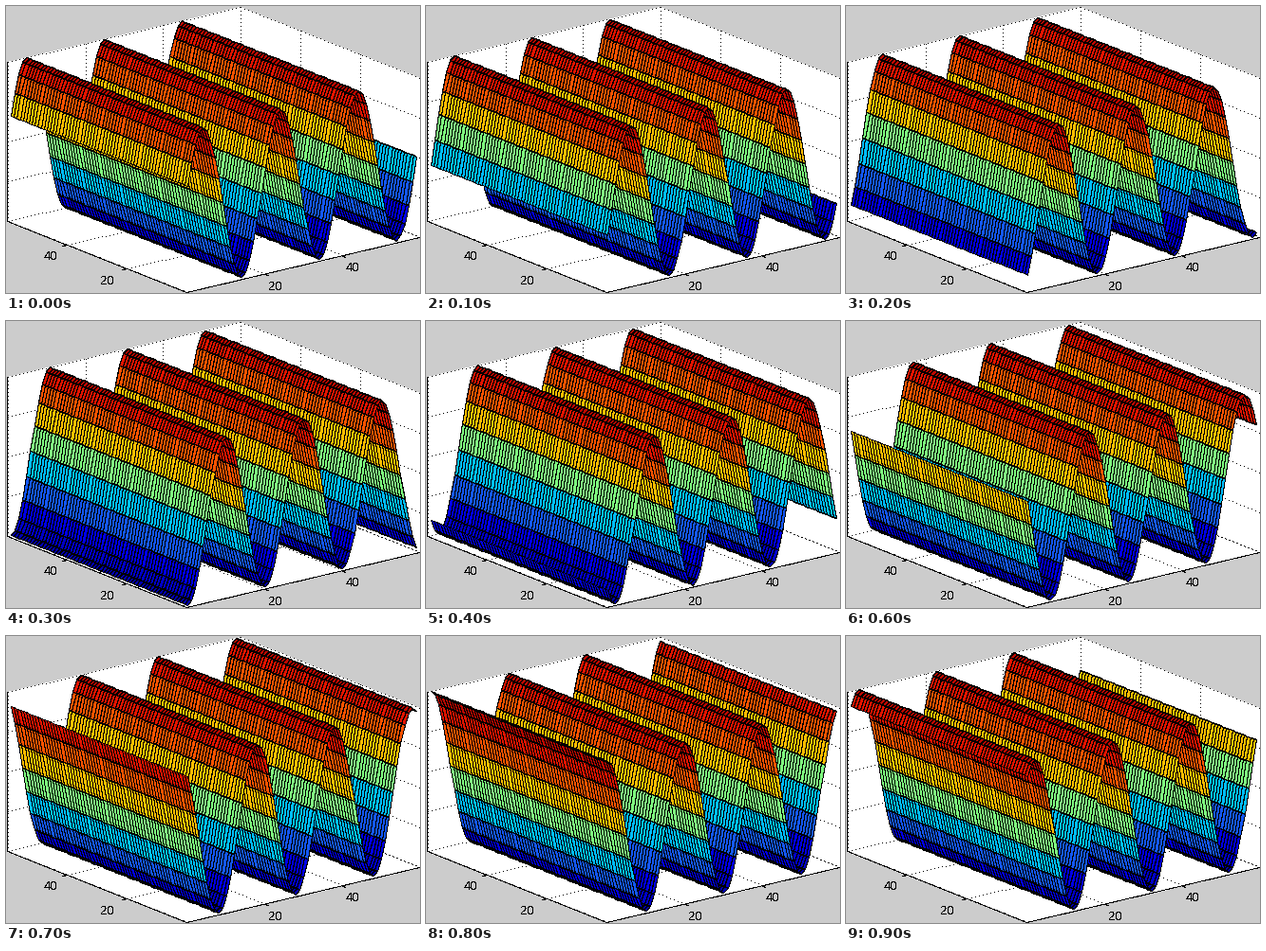
A matplotlib script that plays this animation: 436x303 px, repeating every 1000 ms.

```python
import numpy as np
import matplotlib.pyplot as plt
from matplotlib.animation import FuncAnimation
from matplotlib.collections import PolyCollection

W, H, DPI = 436, 303, 100
FRAMES, INTERVAL = 10, 100
SIZE = 60            # extent of both floor axes
DOT_GAP = 4          # pixels between dots of the grid lines
HAIR = 0.008         # half width of a stroke; aliased fill makes it one pixel

# Face colours by height level, from trough to crest
LEVELS = np.array([
    (0, 0, 175), (0, 0, 200), (0, 0, 232), (20, 88, 245), (0, 191, 255),
    (128, 255, 128),
    (255, 191, 0), (255, 84, 0), (228, 20, 0), (190, 8, 0), (165, 0, 0),
]) / 255


def project(x, y, z):
    """Orthographic view of the plot box, snapped to pixel centres."""
    sx = 190.5 + 4.083 * x - 3.15 * y
    sy = 302.5 - 0.967 * x - 1.25 * y - 84 * (z + 1)
    return np.floor(np.stack(np.broadcast_arrays(sx, sy), axis=-1)) + 0.5


def path(*points):
    return np.array([project(*p) for p in points])


def strokes(start, end):
    """Hairline quads that rasterise as crisp one-pixel lines."""
    run = np.abs(end - start)
    steep = run[..., 1:] > run[..., :1]
    side = np.where(steep, (HAIR, 0), (0, HAIR))
    return np.stack([start + side, end + side, end - side, start - side],
                    axis=-2)


def dots(start, end):
    length = np.abs(end - start).max()
    t = np.arange(0, length + 1, DOT_GAP)[:, None] / length
    return np.floor(start + t * (end - start)) + 0.5


fig = plt.figure(figsize=(W / DPI, H / DPI), dpi=DPI, facecolor="#cccccc")
ax = fig.add_axes([0, 0, 1, 1])
ax.set(xlim=(0, W), ylim=(H, 0))
ax.axis("off")

# White floor and back walls
S = SIZE
walls = [
    path((0, 0, -1), (S, 0, -1), (S, S, -1), (0, S, -1)),
    path((0, S, -1), (S, S, -1), (S, S, 1), (0, S, 1)),
    path((S, 0, -1), (S, S, -1), (S, S, 1), (S, 0, 1)),
]
ax.add_collection(PolyCollection(walls, facecolors="white", edgecolors="none",
                                 antialiaseds=False, zorder=1))

grid = []
for t in range(0, S + 1, 20):
    grid.append(path((t, 0, -1), (t, S, -1), (t, S, 1)))
    grid.append(path((0, t, -1), (S, t, -1), (S, t, 1)))
for z in np.linspace(-1, 1, 5):
    grid.append(path((0, S, z), (S, S, z), (S, 0, z)))
grid_dots = np.concatenate([dots(a, b) for line in grid
                            for a, b in zip(line, line[1:])])
ax.plot(*grid_dots.T, ",", color="black", zorder=2)

axes_lines = [path((0, S, 1), (0, S, -1), (0, 0, -1), (S, 0, -1))]
for t in (20, 40):
    axes_lines.append(path((t, 0, -1), (t, -1.3, -1)))
    axes_lines.append(path((0, t, -1), (-1.3, t, -1)))
axes_strokes = np.concatenate([strokes(p[:-1], p[1:]) for p in axes_lines])
ax.add_collection(PolyCollection(axes_strokes, facecolors="black",
                                 edgecolors="none", antialiaseds=False,
                                 snap=False, zorder=2))

for x, y, label in [(284, 296, "20"), (365, 275, "40"),
                    (47, 264, "40"), (107, 290, "20")]:
    ax.text(x, y, label, family="Liberation Sans", fontsize=13.3 * 72 / DPI,
            ha="center", va="center_baseline", antialiased=False)

# Grid cells ordered from the far corner to the near one
cells = np.arange(S - 1, 0, -1)
CX, CY = (c.ravel() for c in np.meshgrid(cells, cells, indexing="ij"))
CORNERS = [(0, 0), (1, 0), (1, 1), (0, 1)]

# Each cell is a smooth face followed by its four black edges
surface = PolyCollection([], edgecolors="none", linewidths=0, snap=False,
                         antialiaseds=[True] + [False] * 4, zorder=3)
ax.add_collection(surface)


def update(frame):
    def height(x):
        return np.sin(np.pi / 10 * (x - 2 * frame))

    faces = np.stack([project(CX + dx, CY + dy, height(CX + dx))
                      for dx, dy in CORNERS], axis=1)
    edges = strokes(faces, np.roll(faces, -1, axis=1))
    shapes = np.concatenate([faces[:, None], edges], axis=1)
    surface.set_verts(shapes.reshape(-1, 4, 2))

    level = np.rint(np.arcsin(np.clip(height(CX), -1, 1)) / (np.pi / 10)) + 5
    colors = np.zeros((len(CX), 5, 3))
    colors[:, 0] = LEVELS[level.astype(int)]
    surface.set_facecolor(colors.reshape(-1, 3))
    return [surface]


anim = FuncAnimation(fig, update, frames=FRAMES, interval=INTERVAL,
                     repeat=True, repeat_delay=0)
plt.show()
```
